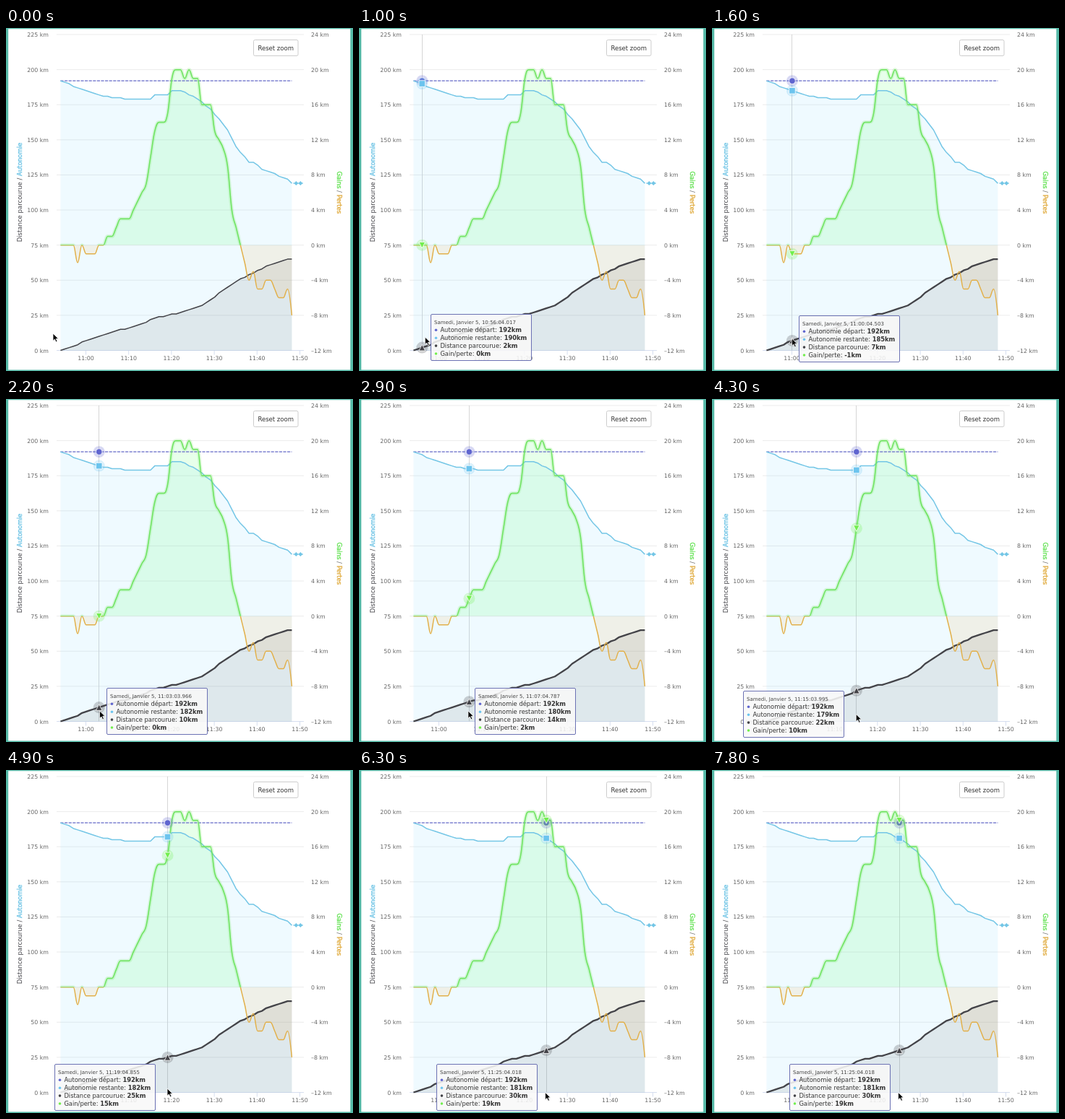
Write an HTML page that moves like this. It is 480 px wide and 475 px high and loops after 8000 ms.

```html
<!DOCTYPE html>
<html lang="fr">
<head>
<meta charset="utf-8">
<style>
html, body { margin: 0; width: 100%; height: 100%; overflow: hidden; background: #fff; }
svg { display: block; font-family: "DejaVu Sans", sans-serif; font-size: 7.85px; fill: #666; }
</style>
</head>
<body>
<svg id="stage" width="480" height="475" viewBox="0 0 480 475"></svg>
<script>
const LOOP = 8000, ENTER = 260, LAST = 54;
const X0 = 75.4, STEP = 5.926, BASE = 446.5, ZERO = 300.7, TOP = 9;
const BLUE = '#74c6e6', GREEN = '#6ce35d', ORANGE = '#e2b04a', DARK = '#434348', INDIGO = '#5f65cf';
const TEAL = '#55b9a7';

// Key points [minute, km]; samples between them are rounded to whole km
const distKeys = [[0, 0], [9, 10], [20, 20], [22, 23], [24, 24], [28, 27], [33, 32], [41, 49], [48, 60],
  [53, 65], [54, 65]];
const rangeKeys = [[0, 192], [5, 186], [9, 182], [12, 180], [16, 179], [21, 179], [22, 182], [25, 182],
  [26, 185], [28, 185], [31, 181], [35, 172], [39, 157], [41, 145], [44, 134], [45, 134], [47, 129],
  [53, 122], [54, 119]];
const gainKeys = [[3, 0], [4, -2], [5, 0], [6, -1.2], [9, -0.2], [14, 2.6], [17, 3.6], [20, 7], [22, 13],
  [25, 15], [26, 19.4], [28, 20], [29, 19], [30, 20], [32, 18.6], [33, 16], [35, 16], [36, 13.3], [39, 9.4],
  [40, 4], [44, -4], [45, -3], [46, -5], [49, -3.8], [52, -6.4], [53, -5], [54, -8]];

// Pointer path: [ms, x, y]
const pointerKeys = [[0, 65, 423], [1000, 91.3, 428], [2200, 129.5, 432], [3700, 175.4, 432],
  [4900, 223, 441], [5950, 257.6, 446.5]];

function lerpKeys(keys, t, col = 1) {
  if (t <= keys[0][0]) return keys[0][col];
  for (let k = 1; k < keys.length; k++) {
    const a = keys[k - 1], b = keys[k];
    if (t <= b[0]) return a[col] + (b[col] - a[col]) * (t - a[0]) / (b[0] - a[0]);
  }
  return keys[keys.length - 1][col];
}
const sample = keys => Array.from({ length: LAST + 1 }, (_, i) => Math.round(lerpKeys(keys, i)));
const dist = sample(distKeys), range = sample(rangeKeys), gain = sample(gainKeys);

const px = i => X0 + i * STEP;
const yKm = v => BASE - v * (BASE - TOP) / 225;
const yGain = v => ZERO - v * (BASE - TOP) / 36;

const stage = document.getElementById('stage');
function add(tag, attrs, parent = stage, text) {
  const el = document.createElementNS('http://www.w3.org/2000/svg', tag);
  for (const k in attrs) el.setAttribute(k, attrs[k]);
  if (text !== undefined) el.textContent = text;
  parent.appendChild(el);
  return el;
}
const rect = (x, y, width, height, more, parent) => add('rect', { x, y, width, height, ...more }, parent);
const line = (x1, y1, x2, y2, stroke, more) => add('line', { x1, y1, x2, y2, stroke, ...more });
const label = (x, y, text, more, parent) => add('text', { x, y, ...more }, parent, text);
const curve = (d, stroke, width, more) => add('path', {
  d, fill: 'none', stroke, 'stroke-width': width, 'stroke-linejoin': 'round', ...more });

const straight = pts => 'M' + pts.map(p => p.map(n => n.toFixed(2)).join(' ')).join('L');

// Smooth curve whose control points never overshoot their neighbours
function spline(pts) {
  const mix = (a, b) => (1.5 * a + b) / 2.5;
  let d = 'M' + pts[0].join(' ');
  let out = pts[0];
  for (let i = 1; i < pts.length; i++) {
    const [x, y] = pts[i], prev = pts[i - 1], next = pts[i + 1];
    let left = [x, y], right = [x, y];
    if (next) {
      const lx = mix(x, prev[0]), rx = mix(x, next[0]);
      let ly = mix(y, prev[1]), ry = mix(y, next[1]);
      const fix = (ry - ly) * (rx - x) / (rx - lx) + y - ry;
      ly += fix;
      ry += fix;
      const clampTo = (v, other) => Math.max(Math.min(other, y), Math.min(Math.max(other, y), v));
      const l2 = clampTo(ly, prev[1]);
      if (l2 !== ly) { ly = l2; ry = 2 * y - ly; }
      const r2 = clampTo(ry, next[1]);
      if (r2 !== ry) { ry = r2; ly = 2 * y - ry; }
      left = [lx, ly];
      right = [rx, ry];
    }
    d += 'C' + [...out, ...left, x, y].map(n => n.toFixed(2)).join(' ');
    out = right;
  }
  return d;
}

// Grid and axes
for (let k = 0; k < 10; k++) {
  const y = TOP + k * (BASE - TOP) / 9, right = 24 - 4 * k;
  line(70, y, 412, y, k === 9 ? '#ccd6eb' : '#e6e6e6', { 'stroke-width': 0.8 });
  label(59, y + 3, 225 - 25 * k + ' km', { 'text-anchor': 'end' });
  label(422, y + 3, (right < 0 ? '–' : '') + Math.abs(right) + ' km');
}
for (let k = 0; k < 6; k++) {
  const x = 110.5 + k * 59.2;
  line(x, BASE, x, BASE + 6, '#ccd6eb', { 'stroke-width': 0.8 });
  label(x, 460, `11:${k}0`, { 'text-anchor': 'middle' });
}

function axisTitle(x, y, turn, parts) {
  const el = label(0, 0, '', {
    transform: `translate(${x} ${y}) rotate(${turn})`, 'text-anchor': 'middle', 'font-size': 8.5 });
  for (const [text, color, weight] of parts)
    add('tspan', { fill: color, stroke: color, 'stroke-width': weight }, el, text);
}
axisTitle(21.5, 227.5, -90, [['Distance parcourue / ', DARK, 0], ['Autonomie', BLUE, 0.45]]);
axisTitle(458, 227.8, 90, [['Gains', GREEN, 0.45], [' / ', '#666', 0], ['Pertes', ORANGE, 0.45]]);

const crosshair = line(0, TOP, 0, BASE, '#ccc', { 'stroke-width': 0.8 });

// Series
const defs = add('defs', {});
rect(60, 0, 360, ZERO, {}, add('clipPath', { id: 'above' }, defs));
rect(60, ZERO, 360, 160, {}, add('clipPath', { id: 'below' }, defs));
const above = { 'clip-path': 'url(#above)' }, below = { 'clip-path': 'url(#below)' };

const rangeLine = straight(range.map((v, i) => [px(i), yKm(v)]));
const distLine = straight(dist.map((v, i) => [px(i), yKm(v)]));
const gainLine = spline(gain.map((v, i) => [px(i), yGain(v)]));
const close = (d, y) => `${d}L${px(LAST)} ${y}L${X0} ${y}Z`;
const area = (d, y, fill, more) => add('path', { d: close(d, y), fill, ...more });

area(rangeLine, BASE, 'rgba(95,205,255,.1)');
area(distLine, BASE, 'rgba(67,67,72,.1)');
area(gainLine, ZERO, 'rgba(85,255,110,.14)', above);
area(gainLine, ZERO, 'rgba(230,150,30,.1)', below);

line(X0, yKm(192), px(LAST), yKm(192), '#666bc8', { 'stroke-width': 1.4, 'stroke-dasharray': '4.2 1.4' });
curve(rangeLine, BLUE, 1.5);
line(397, 215, 411, 215, BLUE, { 'stroke-width': 1 });
for (const x of [401.3, 407.3]) add('path', { d: `M${x - 3} 215l3 -3l3 3l-3 3z`, fill: BLUE });
const distPath = curve(distLine, DARK, 1.5);
curve(gainLine, GREEN, 5, { opacity: 0.22, ...above });
curve(gainLine, GREEN, 1.5, above);
curve(gainLine, ORANGE, 1.5, below);

// Reset button
rect(342.5, 16.5, 61.5, 22, { rx: 2, fill: '#fff', stroke: '#ccc' });
label(373.2, 30.6, 'Reset zoom', { 'text-anchor': 'middle', 'font-size': 8.5, fill: '#333' });

// Page edges
rect(0, 0, 3.2, 475, { fill: TEAL });
rect(476.3, 0, 3.7, 475, { fill: TEAL });
rect(0, 0, 480, 1.3, { fill: TEAL });
rect(0, 473.4, 480, 1.6, { fill: TEAL });

// Hover markers
const hover = add('g', {});
const rows = [
  { name: 'Autonomie départ', color: INDIGO, value: () => 192, y: yKm,
    d: 'M-4.3 0a4.3 4.3 0 1 0 8.6 0a4.3 4.3 0 1 0 -8.6 0z' },
  { name: 'Autonomie restante', color: '#6cc4ee', value: i => range[i], y: yKm, d: 'M-4.3 -4.3h8.6v8.6h-8.6z' },
  { name: 'Distance parcourue', color: DARK, value: i => dist[i], y: yKm, d: 'M0 -4.3L4.3 4.3H-4.3z' },
  { name: 'Gain/perte', color: '#72ee4e', value: i => gain[i], y: yGain, d: 'M-4.3 -4.3H4.3L0 4.3z' }
];
for (const row of rows) {
  row.mark = add('g', {}, hover);
  add('circle', { r: 8, fill: row.color, opacity: 0.25 }, row.mark);
  add('path', { d: row.d, fill: row.color, stroke: '#fff', 'stroke-width': 0.8 }, row.mark);
}

// Tooltip
const tip = add('g', {}, hover);
rect(0.5, 0.5, 139, 64, { rx: 1.5, fill: 'rgba(248,248,248,.87)', stroke: '#6c72b4' }, tip);
const head = label(5, 14, '', { 'font-size': 7, fill: '#444' }, tip);
rows.forEach((row, k) => {
  const y = 25.2 + k * 10.9;
  add('circle', { cx: 7.5, cy: y - 2.9, r: 1.8, fill: row.color }, tip);
  const text = label(13.4, y, '', { 'font-size': 8.35, fill: '#333' }, tip);
  add('tspan', {}, text, row.name + ': ');
  row.out = add('tspan', { 'font-weight': 'bold' }, text);
});

const arrow = add('path', { d: 'M0 0V10.2L2.4 8L4.1 11.8L5.9 11L4.2 7.3H7.4Z',
  fill: '#000', stroke: '#fff', 'stroke-width': 0.8 });

const pointer = t => [lerpKeys(pointerKeys, t), lerpKeys(pointerKeys, t, 2)];
const hovered = t => Math.max(0, Math.min(LAST, Math.round((pointer(t)[0] - 1.3 - X0) / STEP)));

function tipTarget(t) {
  const x = px(hovered(t));
  return [x > 156 ? x - 152 : x + 12, Math.min(407, pointer(t)[1] - 32)];
}

// The box covers a third of the remaining way every 32 ms
function tipPlace(t) {
  let x = 0, y = 0, w = 1 / 3, sum = 0;
  for (let k = 0; k < 24; k++, w *= 2 / 3) {
    const [tx, ty] = tipTarget(Math.max(ENTER, t - 32 * k));
    x += tx * w;
    y += ty * w;
    sum += w;
  }
  return [Math.round(x / sum), Math.round(y / sum)];
}

function stamp(i) {
  const min = 54 + i, secs = 4.45 + 0.49 * Math.sin(2.6 * i);
  const two = n => String(n).padStart(2, '0');
  return `Samedi, Janvier 5, ${10 + Math.floor(min / 60)}:${two(min % 60)}:0${secs.toFixed(3)}`;
}

const move = (el, x, y) => el.setAttribute('transform', `translate(${x.toFixed(2)} ${y.toFixed(2)})`);

function render(t) {
  move(arrow, ...pointer(t));
  const on = t >= ENTER;
  for (const el of [hover, crosshair]) el.setAttribute('visibility', on ? 'visible' : 'hidden');
  distPath.setAttribute('stroke-width', on ? 2.3 : 1.5);
  if (!on) return;
  const i = hovered(t), x = px(i), lineX = Math.floor(x) + 0.5;
  crosshair.setAttribute('x1', lineX);
  crosshair.setAttribute('x2', lineX);
  for (const row of rows) {
    const v = row.value(i);
    move(row.mark, x, row.y(v));
    row.out.textContent = v + 'km';
  }
  head.textContent = stamp(i);
  move(tip, ...tipPlace(t));
}

const start = performance.now();
function tick() {
  render((performance.now() - start) % LOOP);
  requestAnimationFrame(tick);
}
tick();
</script>
</body>
</html>
```
